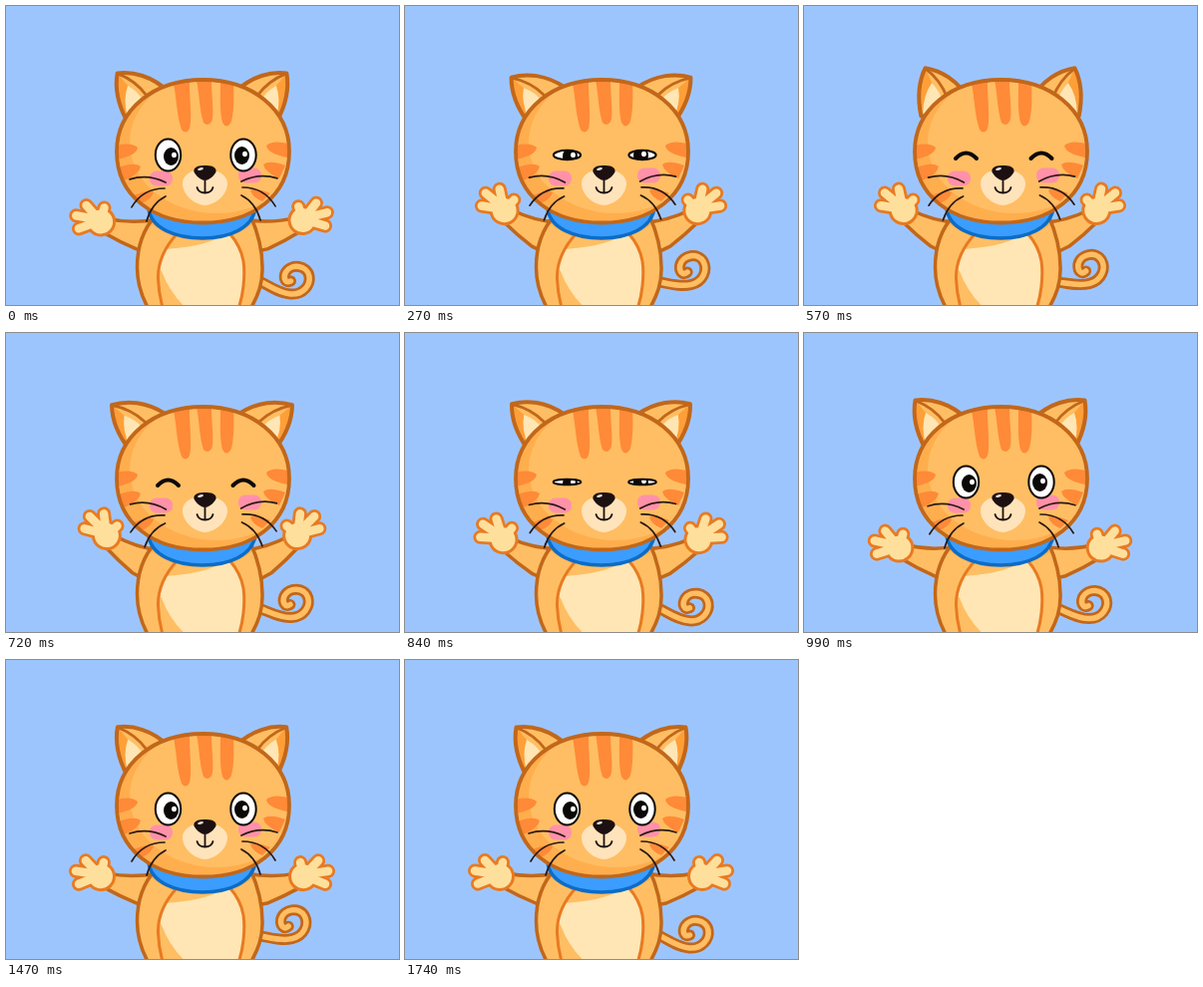
An HTML page with a canvas that plays this animation: 394 by 300 pixels, repeating every 1.77 s.

```html
<!DOCTYPE html>
<html>
<head>
<meta charset="utf-8">
<style>
html, body { margin: 0; width: 100%; height: 100%; overflow: hidden; background: #9dc5fd; }
canvas { display: block; }
</style>
</head>
<body>
<canvas id="stage" width="394" height="300"></canvas>
<script>
const LOOP = 1770;
const ctx = document.getElementById('stage').getContext('2d');
const SKY = '#9dc5fd', FUR = '#ffbe63', SHADE = '#ffae4e', STRIPE = '#ff8a38',
      LINE = '#c2671a', CREAM = '#ffe6b4', HAND = '#ffdf9c', HAND_LINE = '#e87a22', INK = '#0b0808';

const P = d => new Path2D(d);
const shapes = {
  head: P('M197.5 74C247 74 284 104 284 146C284 191 247 217.500 197.500 217.500C148 217.500 111 191 111 146C111 104 148 74 197.500 74Z'),
  body: P('M150 210C134 228 131.500 248 131.500 262C131.500 278 135 290 143 304L245 304C253 290 257.500 278 257 262C257 246 252 226 245 210Z'),
  neckShade: P('M147 212Q196 250 247 212'),
  belly: P('M172 228C158 243 152 258 152.500 274C153 286 155 296 158 306L232 306C238 292 240 270 238 256C236 244 231 236 224 228Z'),
  bellyLight: P('M150 262L150 244Q196 244 222 228L245 228L245 306L184 306Q165 290 156 266Z'),
  collar: P('M143 203C145 223 170 233 197 233C224 233 247 223 250 203Z'),
  tail: P('M248 273C262 279 272 288 285 289C298 290 305.500 280 304 271C302 260 286 258 280.500 267C277.500 273 280 278.500 285.500 276'),
  arm: P('M152 214Q126 219 102 214L98 228Q114 237 131 244L152 248Z'),
  digits: P('M95 216L98 203M93 215L80 201M92 215L70 211.500M92 217L73 224.500'),
  ear: P('M121 115C112 98 109 82 111.500 67.500C127 65.500 146 70 163 86L150 108Z'),
  earFur: P('M112 68C127 66 146 70 163 86L150 108L122 112L122 80Z'),
  earInner: P('M122 80Q134 87 137 95L122 112Q117 94 122 80Z'),
  earFold: P('M112 68Q130 75 141 90'),
  stripes: P('M168 78Q178 74 184 76C184 95 187 117 183.500 124Q180 129 176 124C171 110 171 92 168 78Z' +
    'M191 74L206 74C206 90 209 108 206.500 115Q203 122 198 117C194 105 194 90 191 74Z' +
    'M215 74L228 78C229 95 228 110 225.500 117Q221 124 217 117C214 105 215 90 215 74Z'),
  sideStripes: P('M110 140Q126 136 132 142Q131 150 111 154ZM113 162Q129 156 135 161Q134 168 119 175Z' +
    'M128 190Q143 184 148 187Q146 194 136 198Z'),
  muzzle: P('M199 164C211 163 222 169 222 178C222 189 211 199 199.500 200C188 199 177 189 177 178C177 169 187 163 199 164Z'),
  nose: P('M199.500 160C207 159.500 211.500 162.500 210.500 166.500C208.500 170.500 203.500 175 199.500 175C195.500 175 190.500 170.500 188.500 166.500C187.500 162.500 192 159.500 199.500 160Z'),
  mouth: P('M199.500 175V187M191.500 182Q193 187.500 199.500 187.500Q206 187.500 207.500 182'),
  whiskers: P('M160 177Q142 168 124 174M159 183Q137 183 126 202M160 191Q146 198 141 216'),
  smile: P('M-10.500 3.500Q0 -7.500 10.500 3.500')
};

// Smooth interpolation through [time, value] pairs.
function track(keys, t) {
  let i = 1;
  while (i < keys.length - 1 && t > keys[i][0]) i++;
  const [t0, a] = keys[i - 1], [t1, b] = keys[i];
  const u = Math.min(1, Math.max(0, (t - t0) / (t1 - t0)));
  return a + (b - a) * (1 - Math.cos(Math.PI * u)) / 2;
}
const lift = [[300, .86], [430, .7], [710, 1], [1050, .03], [1300, -.05], [1540, 0], [1770, 0]];
const leftLift = [[0, .04], ...lift], rightLift = [[0, .14], ...lift];
const eyeOpen = [[150, 1], [340, 0], [800, 0], [950, 1]];

function earSwing(t) {
  if (t < 885) return -Math.sin(2 * Math.PI * t / 442.5) * 1.3;
  return t > 1050 && t < 1500 ? -.25 * Math.sin(Math.PI * (t - 1050) / 450) : 0;
}

function fill(shape, color) { ctx.fillStyle = color; ctx.fill(shape); }
function stroke(shape, color, width) {
  ctx.strokeStyle = color;
  ctx.lineWidth = width;
  ctx.stroke(shape);
}
function oval(x, y, rx, ry) {
  const p = new Path2D();
  p.ellipse(x, y, rx, ry, 0, 0, 7);
  return p;
}
function group(draw) { ctx.save(); draw(); ctx.restore(); }
function turn(x, y, deg) {
  ctx.translate(x, y);
  ctx.rotate(deg * Math.PI / 180);
  ctx.translate(-x, -y);
}
// Draws once as is and once reflected, for the left and right sides.
function both(draw) {
  group(() => draw(0));
  group(() => { ctx.translate(393, 0); ctx.scale(-1, 1); draw(1); });
}

function drawArm(raise) {
  turn(140, 228, 18 * raise);
  fill(shapes.arm, FUR);
  stroke(shapes.arm, LINE, 3.5);
  turn(97, 217, 18 * raise);
  const palm = oval(95, 217, 12, 12);
  stroke(palm, HAND_LINE, 6);
  stroke(shapes.digits, HAND_LINE, 14);
  fill(palm, HAND);
  stroke(shapes.digits, HAND, 8.5);
}

function drawEar(swing) {
  turn(135, 100, -swing * (swing > 0 ? 11 : 13));
  fill(shapes.ear, '#ff9f38');
  fill(shapes.earFur, FUR);
  fill(shapes.earInner, CREAM);
  stroke(shapes.earFold, LINE, 2.8);
  stroke(shapes.ear, LINE, 4);
}

function drawEye(x, pupilX, pupilY, open) {
  if (open < .12) {
    group(() => { ctx.translate(x, 149.5); stroke(shapes.smile, INK, 4); });
    return;
  }
  const eye = oval(x, 149.5, 14 - open * 1.3, 16 * open);
  fill(eye, '#fff');
  group(() => {
    ctx.clip(eye);
    fill(oval(pupilX, pupilY, 7.5, 9), INK);
    fill(oval(pupilX + 3, pupilY - 1.5, 2.4, 2.8), '#fff');
  });
  stroke(eye, INK, 2);
}

function drawCheek(x, y) {
  const p = new Path2D();
  p.roundRect(x, y, 23, 15, 7);
  fill(p, '#ff91a9');
}

function drawBody() {
  fill(shapes.body, FUR);
  group(() => {
    ctx.clip(shapes.body);
    stroke(shapes.neckShade, SHADE, 12);
  });
  stroke(shapes.body, LINE, 3.5);
  fill(shapes.belly, FUR);
  group(() => {
    ctx.clip(shapes.belly);
    fill(shapes.bellyLight, CREAM);
  });
  stroke(shapes.belly, HAND_LINE, 3);
  fill(shapes.collar, '#3b9dff');
  stroke(shapes.collar, '#0b6cc6', 3.4);
}

function drawHead() {
  fill(shapes.head, SHADE);
  group(() => {
    ctx.clip(shapes.head);
    fill(oval(211, 137, 87, 71), FUR);
    fill(shapes.stripes, STRIPE);
    both(side => {
      ctx.translate(0, -2 * side);
      fill(shapes.sideStripes, STRIPE);
    });
  });
  stroke(shapes.head, LINE, 3.8);
}

function drawFace(open, raise) {
  drawCheek(144, 165.5);
  drawCheek(233, 162.5);
  fill(shapes.muzzle, '#ffe3bb');
  drawEye(162.5, 165.5, 151, open);
  drawEye(238, 236.5, 150, open);
  fill(shapes.nose, '#1c1010');
  group(() => { turn(195, 163.5, -15); fill(oval(195, 163.5, 3, 1.3), '#e9dcdc'); });
  stroke(shapes.mouth, '#1c1010', 1.8);
  both(side => {
    if (side) ctx.translate(-3, -1);
    turn(160, 183, 3.5 * raise);
    stroke(shapes.whiskers, '#2b1912', 1.7);
  });
}

function draw(t) {
  const left = track(leftLift, t), right = track(rightLift, t);
  ctx.fillStyle = SKY;
  ctx.fillRect(0, 0, 394, 300);
  ctx.lineCap = ctx.lineJoin = 'round';
  group(() => {
    const wag = (1 - Math.cos(2 * Math.PI * t / 870)) / 2;
    turn(256, 279, -26 * wag);
    stroke(shapes.tail, LINE, 11);
    stroke(shapes.tail, FUR, 5.5);
  });
  both(side => drawArm(side ? right : left));
  drawBody();
  both(() => drawEar(earSwing(t)));
  drawHead();
  drawFace(track(eyeOpen, t), left);
}

const start = performance.now();
function tick() {
  draw((performance.now() - start) % LOOP);
  requestAnimationFrame(tick);
}
tick();
</script>
</body>
</html>
```
